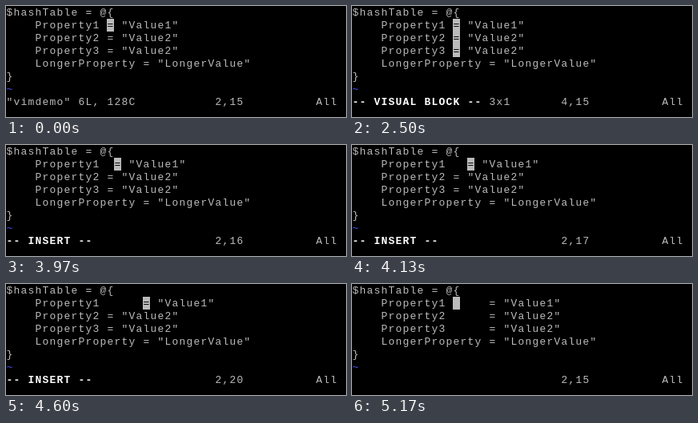
An HTML page for the animation above (6.71 s loop, 425 by 139 pixels).

```html
<!DOCTYPE html>
<html lang="en">
<head>
<meta charset="utf-8">
<style>
  html, body { margin: 0; width: 100%; height: 100%; overflow: hidden; background: #000; }
  svg { display: block; width: 425px; height: 139px; }
  text {
    font: 13px "Liberation Mono", "Courier New", monospace;
    letter-spacing: 1.2px;
    white-space: pre;
    fill: #bbb;
  }
  .bold { font-weight: bold; fill: #fff; }
  .tilde { fill: #55f; }
  .inverse { fill: #000; }
  rect { fill: #bbb; }
</style>
</head>
<body>
<svg id="screen" viewBox="0 0 425 139"></svg>
<script>
const LOOP = 6710, CELL_W = 9, CELL_H = 16, BASELINE = 12, INDENT = 0.5;
const screen = document.getElementById("screen");

// Each step: start time, mode, and the mode's count (selected rows or typed spaces)
const steps = [
  [0, "normal"],
  [2170, "visual", 1], [2400, "visual", 2], [2500, "visual", 3],
  [3330, "insert", 0], [3970, "insert", 1], [4130, "insert", 2],
  [4270, "insert", 3], [4400, "insert", 4], [4600, "insert", 5],
  [5070, "escape"], [5170, "done"],
];

function add(tag, attributes, content = "") {
  const node = document.createElementNS("http://www.w3.org/2000/svg", tag);
  for (const name in attributes) node.setAttribute(name, attributes[name]);
  node.textContent = content;
  screen.append(node);
}

function put(row, col, string, style = "") {
  add("text", { x: col * CELL_W + INDENT, y: row * CELL_H + BASELINE, class: style }, string);
}

function invert(row, col, char) {
  add("rect", { x: col * CELL_W, y: row * CELL_H, width: CELL_W, height: CELL_H });
  put(row, col, char, "inverse");
}

function draw([, mode, count = 0]) {
  screen.replaceChildren();
  const done = mode === "done";
  const typed = mode === "insert" ? count : mode === "escape" || done ? 5 : 0;
  const cursorRow = mode === "visual" ? count + 1 : 2;

  put(0, 0, "$hashTable = @{");
  ["Value1", "Value2", "Value2"].forEach((value, i) => {
    const equals = 14 + (i === 0 ? typed : done ? 5 : 0);
    put(i + 1, 4, "Property" + (i + 1));
    put(i + 1, equals, `= "${value}"`);
  });
  put(4, 4, 'LongerProperty = "LongerValue"');
  put(5, 0, "}");
  put(6, 0, "~", "tilde");

  if (mode === "escape") {
    put(7, 19, "^[");
    return;
  }
  for (let row = 1; row < cursorRow; row++) {
    invert(row, done ? 14 : 14 + typed, done ? " " : "=");
  }

  if (mode === "normal") put(7, 0, '"vimdemo" 6L, 128C');
  if (mode === "insert") put(7, 0, "-- INSERT --", "bold");
  if (mode === "visual") {
    put(7, 0, "-- VISUAL BLOCK --", "bold");
    put(7, 19, count + "x1");
  }
  put(7, 29, `${cursorRow},${done ? 15 : 15 + typed}`);
  put(7, 43, "All");
}

let shown;
const start = performance.now();
function tick() {
  const time = (performance.now() - start) % LOOP;
  const step = steps.findLast(([from]) => from <= time);
  if (step !== shown) draw(shown = step);
  requestAnimationFrame(tick);
}
tick();
</script>
</body>
</html>
```
